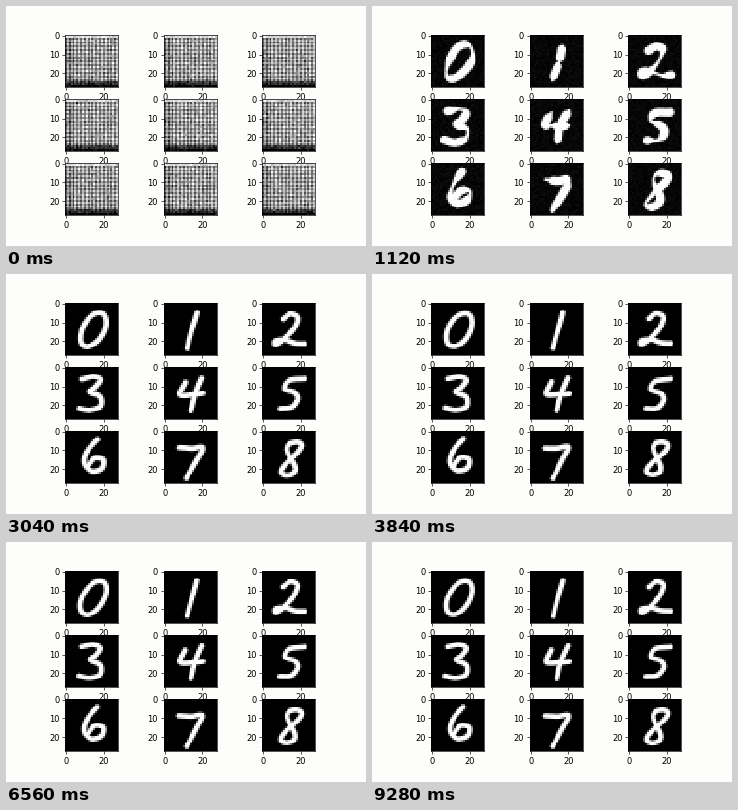
Recreate the animation shown at these times as a matplotlib script. Size 360 px wide and 240 px high, loop 9440 ms.

```python
import numpy as np
import matplotlib.pyplot as plt
from matplotlib.animation import FuncAnimation

FRAMES, STEP = 59, 160
SIZE = 28
PAPER = "#fdfefb"
YY, XX = np.mgrid[0:SIZE, 0:SIZE].astype(float)
S = np.linspace(0, 1, 90)
T = 2 * np.pi * S


def spline(*points):
    """Catmull-Rom curve through a few (x, y) points."""
    p = np.array(points, float)
    q = np.vstack([2 * p[0] - p[1], p, 2 * p[-1] - p[-2]])
    u = S * (len(p) - 1)
    k = np.minimum(u.astype(int), len(p) - 2)
    f = (u - k)[:, None]
    a, b, c, d = (q[k + n] for n in range(4))
    return 0.5 * (2 * b + (c - a) * f + (2 * a - 5 * b + 4 * c - d) * f**2
                  + (3 * b - a - 3 * c + d) * f**3)


def loop(x, y, width, height, lobes, slant):
    """Closed slanted curve: one lobe is an oval, two make an eight."""
    rise = height * np.cos(T)
    return np.stack([x + width * np.sin(lobes * T) + slant * rise, y - rise], 1)


DIGITS = [
    [loop(14.4, 14.2, 6, 8.8, 1, 0.37)],
    [spline((16.9, 5.3), (14.4, 14), (11.8, 23.7))],
    [spline((10.6, 8.5), (14.7, 5.7), (18.3, 7.7), (16, 13.7), (11, 19),
            (7, 22), (6.8, 20), (12, 19.5), (17, 21), (22, 21.2))],
    [spline((8.5, 6.3), (14.5, 5), (18.2, 7), (15.5, 11), (12.6, 13.1),
            (18, 15.8), (18, 20.8), (12.5, 22.7), (7, 21.7))],
    [spline((10.6, 8), (8, 14.3), (14, 14.7), (20, 14)),
     spline((19.5, 5.8), (15.9, 14), (13.7, 23))],
    [spline((21.9, 6.3), (14, 7.5), (11.6, 11.7), (16.8, 13.7),
            (18.4, 17.2), (15, 21.5), (9, 22))],
    [spline((16.5, 4.2), (11.2, 10.7), (9.8, 17), (13.5, 21),
            (18.7, 19.6), (19.8, 15.2), (15.6, 14.1), (12, 17.7))],
    [spline((7.5, 9), (14, 9.2), (19.6, 8.7), (16.9, 15), (11.4, 25))],
    [loop(14.9, 14.5, 3.7, 8.7, 2, 0.28)],
]


def wobble(p, rng, amp):
    """Smooth random bend plus a small shift."""
    phase = rng.uniform(0, 2 * np.pi, 2)
    bend = np.sin(p[:, ::-1] / 3.5 + phase)
    return p + amp * (bend + rng.normal(0, 0.3, 2))


def grid(rng):
    """Lattice of an untrained generator, dark at the left and bottom."""
    g = 0.36 + 0.3 * (XX % 2) + 0.2 * (YY % 2)
    g[:, :5] -= 0.12
    g[:2] = 0.85
    g[25:] *= 0.35
    g[27] = 0
    return g + rng.normal(0, 0.07, g.shape)


def digit_image(d, i):
    rng = np.random.default_rng(100 * d + i)
    early = np.exp(-max(i - 7, 0) / 3)
    blur = max(7 - i, 0) / 7
    amp = 0.08 + 0.75 * np.exp(-i / 10)
    width = 1.3 + 0.25 * np.exp(-i / 20) + 0.75 * early
    width = width * (1 - 0.65 * early * np.clip(np.sin(12 * S + 2 * d), 0, 1))

    ink = np.zeros((SIZE, SIZE))
    for path in DIGITS[d]:
        p = wobble(path, rng, amp)
        dist = np.hypot(XX[..., None] - p[:, 0], YY[..., None] - p[:, 1])
        ink = np.maximum(ink, ((width - dist) / (1 + 3 * blur) + 0.5).max(-1))
    ink = np.clip(ink, 0, 1)

    # Edges and faint parts flicker more than the solid core.
    rough = 0.15 + 0.4 * np.exp(-i / 20)
    ink *= 1 - rough * rng.random(ink.shape) * (1.1 - ink)
    ink += 0.05 * early * rng.random(ink.shape)
    raw = 0.42 ** i
    return np.clip(raw * grid(rng) + (1 - raw) * ink, 0, 1)


plt.rcParams["font.family"] = "DejaVu Sans"
fig = plt.figure(figsize=(6, 4), dpi=60, facecolor=PAPER)
fig.subplots_adjust(left=0.1242, right=0.8992, bottom=0.1275, top=0.88,
                    wspace=0.2, hspace=0.2135)
images = []
for d in range(9):
    ax = fig.add_subplot(3, 3, d + 1)
    images.append(ax.imshow(digit_image(d, 0), cmap="gray", vmin=0, vmax=1,
                            interpolation="nearest"))
    ax.set_xticks([0, 20])
    ax.set_yticks([0, 10, 20])


def update(i):
    for d, im in enumerate(images):
        im.set_data(digit_image(d, i))
    return images


anim = FuncAnimation(fig, update, frames=FRAMES, interval=STEP, repeat=True)
plt.show()
```
